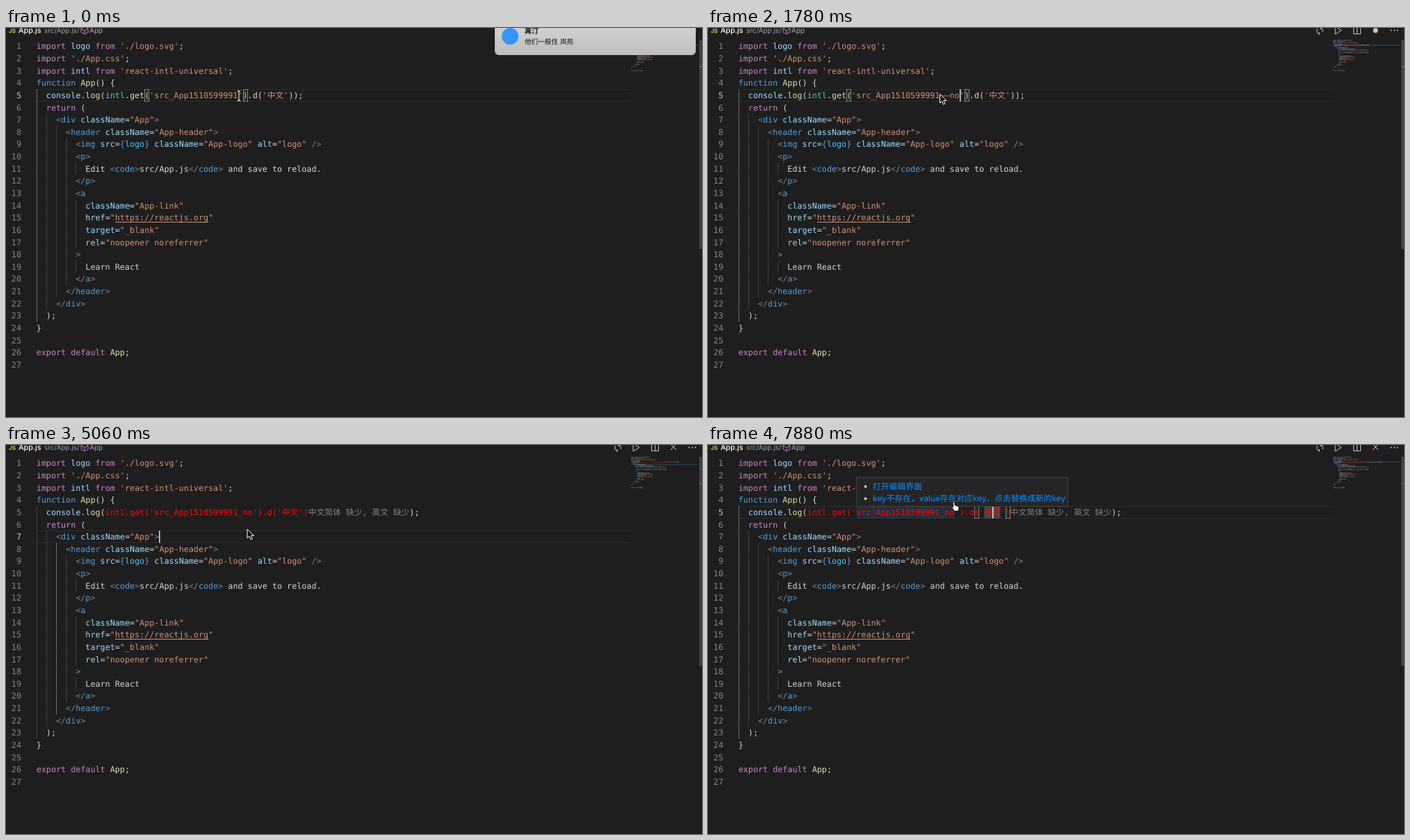
These frames come from a looping animation (1001 px wide and 560 px high, 8 s). An HTML page with a canvas:

```html
<!DOCTYPE html>
<html lang="zh">
<head>
<meta charset="utf-8">
<title>Editor</title>
<style>
  html, body { margin: 0; width: 100%; height: 100%; overflow: hidden; background: #1e1e1e; }
  canvas { display: block; }
</style>
</head>
<body>
<canvas id="stage" width="1001" height="560"></canvas>
<script>
const ctx = document.getElementById('stage').getContext('2d');
const LOOP = 8000, LEFT = 43.7, ROW = 17.63, SIZE = 11.74, CH = SIZE * 0.602;
const MONO = `${SIZE}px "DejaVu Sans Mono", "Noto Sans CJK SC", "Noto Sans CJK", monospace`;
const sans = (size, weight = 400) =>
  `${weight} ${size}px Inter, "Noto Sans CJK SC", "Noto Sans CJK", sans-serif`;
const COLORS = {
  p: '#c586c0', v: '#9cdcfe', s: '#ce9178', w: '#d4d4d4', b: '#569cd6', f: '#dcdcaa',
  g: '#808080', t: '#4ec9b0', c: '#4fc1ff', r: '#ff0000', u: '#ce9178'
};

// Each run is "~", a colour key, then its text.
const CODE = [
  "~pimport ~vlogo ~pfrom ~s'./logo.svg'~w;",
  "~pimport ~s'./App.css'~w;",
  "~pimport ~vintl ~pfrom ~s'react-intl-universal'~w;",
  "~bfunction ~fApp~w() {",
  "",
  "~w  ~preturn ~w(",
  "~w    ~g<~bdiv ~vclassName~w=~s\"App\"~g>",
  "~w      ~g<~bheader ~vclassName~w=~s\"App-header\"~g>",
  "~w        ~g<~bimg ~vsrc~w=~b{~clogo~b} ~vclassName~w=~s\"App-logo\" ~valt~w=~s\"logo\" ~g/>",
  "~w        ~g<~bp~g>",
  "~w          Edit ~g<~bcode~g>~wsrc/App.js~g</~bcode~g>~w and save to reload.",
  "~w        ~g</~bp~g>",
  "~w        ~g<~ba",
  "~w          ~vclassName~w=~s\"App-link\"",
  "~w          ~vhref~w=~s\"~uhttps://reactjs.org~s\"",
  "~w          ~vtarget~w=~s\"_blank\"",
  "~w          ~vrel~w=~s\"noopener noreferrer\"",
  "~w        ~g>",
  "~w          Learn React",
  "~w        ~g</~ba~g>",
  "~w      ~g</~bheader~g>",
  "~w    ~g</~bdiv~g>",
  "~w  );",
  "~w}",
  "",
  "~pexport default ~fApp~w;",
  ""
];

// Stepped tracks: [start time, value]
const SUFFIX = [[0, ''], [1180, '—'], [1330, '——'], [1630, '——n'], [1780, '——no'], [2080, '——n'],
  [2230, '——'], [2530, '—'], [2830, ''], [3280, '_'], [3720, '_n'], [4160, '_no']];
const TOAST = [[0, 0], [900, 10], [1040, 95], [1180, 230], [1330, null]];
const CARET = [[0, false], [150, true], [4310, false], [4610, true], [5350, false],
  [5800, true], [7290, false], [7880, true]];
const MOUSE = [[0, ['beam', 335, 97]], [750, ['arrow', 333.5, 95]], [4310, ['arrow', 341, 116]],
  [4460, ['arrow', 347, 121]], [5210, ['arrow', 364, 111]], [5350, ['arrow', 381, 101]],
  [5500, ['arrow', 388, 94]], [6100, ['arrow', 372, 95]], [6240, ['arrow', 357, 95]],
  [6390, ['arrow', 349, 94]], [6990, ['arrow', 350, 90]], [7140, ['hand', 351, 85]],
  [7290, ['hand', 351, 82]]];

const at = (track, time) => track.findLast(step => step[0] <= time)[1];
const rowTop = line => line * ROW;
const isWide = char => char >= '\u2e80';
const textWidth = text => [...text].reduce((sum, c) => sum + (isWide(c) ? SIZE : CH), 0);
const parse = line => line.split('~').slice(1).map(run => [run[0], run.slice(1)]);

function rect(x, y, w, h, color) {
  ctx.fillStyle = color;
  ctx.fillRect(x, y, w, h);
}
function frame(x, y, w, h, color) {
  ctx.strokeStyle = color;
  ctx.lineWidth = 1;
  ctx.strokeRect(Math.round(x) + .5, Math.round(y) + .5, Math.round(w), Math.round(h));
}
function label(text, x, y, font, color, align = 'left') {
  ctx.font = font;
  ctx.fillStyle = color;
  ctx.textAlign = align;
  ctx.fillText(text, x, y);
}
function disc(x, y, r, color) {
  ctx.fillStyle = color;
  ctx.beginPath();
  ctx.arc(x, y, r, 0, 7);
  ctx.fill();
}
function strokePath(d, color, width = 1) {
  ctx.strokeStyle = color;
  ctx.lineWidth = width;
  ctx.stroke(new Path2D(d));
}

function keyLine(key, missing) {
  return missing
    ? `~w  ~vconsole~w.~flog~w(~rintl.get('${key}').d('中文')~g中文简体 缺少, 英文 缺少~w);`
    : `~w  ~vconsole~w.~flog~w(~tintl~w.~fget~w(~s'${key}'~w).~fd~w(~s'中文'~w));`;
}

function drawCode(lines) {
  lines.forEach((line, i) => {
    let x = LEFT;
    const y = rowTop(i + 1) + 12.8;
    for (const [kind, text] of parse(line)) {
      const width = textWidth(text);
      label(text, x, y, MONO, COLORS[kind]);
      if (kind === 'u') rect(x, Math.round(y + 1.5), width, 1, COLORS.u);
      x += width;
    }
  });
}

function drawGuides(activeLine) {
  const activeCol = activeLine === 7 ? 4 : 0;
  CODE.forEach((line, i) => {
    const indent = i === 4 ? 2 : line.slice(2).search(/[^ ]/);
    const depth = line.startsWith('~w ') && indent > 0 && line[2 + indent] === '~' || i === 4
      ? indent : Math.max(0, indent);
    for (let col = 0; col < depth; col += 2)
      rect(Math.round(LEFT + col * CH), rowTop(i + 1), 1, ROW, col === activeCol ? '#707070' : '#404040');
  });
}

function drawMinimap(lines, activeLine) {
  rect(899, 17 + (activeLine - 1) * 1.75, 97, 1.4, '#263c50');
  ctx.globalAlpha = .5;
  lines.forEach((line, i) => {
    let x = 899;
    for (const [kind, text] of parse(line))
      for (const char of text) {
        const w = isWide(char) ? 1.5 : .88;
        if (char !== ' ') rect(x, 17 + i * 1.75, w * .85, 1.2, COLORS[kind]);
        x += w;
      }
  });
  ctx.globalAlpha = 1;
  rect(997, 17, 4, 301, '#424242');
  rect(997, 55, 4, 1, '#777');
}

function drawHeader(saved, inputBadge) {
  label('JS', 4, 6.5, sans(8, 700), '#cbcb41');
  label('App.js', 18, 7, sans(10.7, 500), '#fff');
  label('src/App.js/', 55, 7, sans(9.9), '#a0a0a0');
  strokePath('M108 1L113 -2L118 1V6L113 9L108 6ZM108 1L113 4L118 1M113 4V9', '#b180d7');
  label('App', 120, 7, sans(10), '#a9a9a9');

  const icon = '#c5c5c5';
  strokePath('M876 1V6Q876 8 880 8M878 6L880 8L878 10M884 6V2Q884 0 880 0M882 -2L880 0L882 2', icon);
  strokePath('M902 -2L911 3.5L902 9Z', icon);
  strokePath('M928.5 -2V8.5H938.5V-2M933.5 -2V8', icon);
  if (saved) strokePath('M956 -1L964 7M964 -1L956 7', icon);
  else disc(960, 3.5, 3.5, icon);
  for (const x of [982.5, 987, 991.5]) disc(x, 3.5, 1, icon);
  if (inputBadge) {
    rect(882, 0, 119, 14, 'rgba(30,30,30,.86)');
    label('Abc', 896, 6, sans(19.3, 500), '#fff');
  }
}

function drawPopup(items) {
  const height = items.length > 1 ? 42 : 24;
  const top = 88 - height;
  const width = items.length > 1 ? 304 : 101;
  rect(213, top, width, height, '#252526');
  frame(213, top, width, height, '#454545');
  items.forEach((text, i) => {
    const y = 81.3 - (items.length - 1 - i) * ROW;
    disc(226.5, y - 4, 2, '#ccc');
    label(text, 237, y, sans(11.8), '#0a8cff');
  });
}

function drawToast(offset) {
  const x = 703 + offset;
  const fill = ctx.createLinearGradient(0, 0, 0, 39);
  fill.addColorStop(0, '#d0d0d0');
  fill.addColorStop(1, '#bdbdbd');
  ctx.fillStyle = fill;
  ctx.beginPath();
  ctx.roundRect(x, -20, 289, 59, 6);
  ctx.fill();
  disc(x + 22, 12, 12, '#3296fa');
  label('苒汀', x + 43, 8, sans(10, 700), '#111');
  label('他们一般住 岚苑', x + 43, 23, sans(9.6), '#111');
}

function drawMouse([kind, x, y]) {
  ctx.save();
  ctx.translate(x, y);
  if (kind === 'beam') {
    const d = 'M-2.5 -7Q0 -7 0 -5V6Q0 8 -2.5 8M2.5 -7Q0 -7 0 -5M0 6Q0 8 2.5 8';
    strokePath(d, '#111', 2.5);
    strokePath(d, '#eee', 1.2);
  } else {
    const hand = kind === 'hand';
    const shape = new Path2D(hand
      ? 'M1 1Q3 -1 4 2V5Q6 4 6.5 6Q8 5 8.5 7Q10 6 10 8L9 13H3L0 8Q0 6 2 7Z'
      : 'M0 0V13L3 10.3L5 15L7.3 14L5.4 9.5H9.5Z');
    ctx.fillStyle = hand ? '#fff' : '#111';
    ctx.fill(shape);
    ctx.lineWidth = 1;
    ctx.strokeStyle = hand ? '#111' : '#fff';
    ctx.stroke(shape);
  }
  ctx.restore();
}

function draw(time) {
  const key = 'src_App1510599991' + at(SUFFIX, time);
  const lines = CODE.slice();
  lines[4] = keyLine(key, time >= 4310);
  const activeLine = time >= 4610 && time < 5800 ? 7 : 5;
  const editingValue = time >= 5800;
  const keyLeft = LEFT + 24 * CH, keyEnd = keyLeft + textWidth(key);
  const valueLeft = keyEnd + 6 * CH, valueEnd = valueLeft + 2 * SIZE;
  const top = rowTop(5);

  rect(0, 0, 1001, 560, '#1e1e1e');
  for (const y of [rowTop(activeLine), rowTop(activeLine + 1) - 1])
    rect(44, Math.round(y), 852, 1, '#2b2b2b');
  drawGuides(activeLine);
  for (let n = 1; n <= 27; n++)
    label(n, 22, rowTop(n) + 12.8, MONO, n === activeLine ? '#c6c6c6' : '#858585', 'right');

  const hoverKey = time >= 750 && time < 1180 || time >= 6690;
  if (time >= 300 && time < 1180) rect(keyLeft, top, keyEnd - keyLeft, ROW, '#505050');
  if (hoverKey) rect(keyLeft, top, keyEnd - keyLeft, ROW, 'rgba(38,79,120,.35)');
  if (time >= 6100) rect(valueLeft, top, valueEnd - valueLeft, ROW, '#474747');
  if (activeLine === 5) {
    const pair = editingValue ? [valueLeft - 2 * CH, valueEnd + CH] : [keyLeft - 2 * CH, keyEnd + CH];
    for (const x of pair) {
      rect(x, top, CH, ROW, 'rgba(0,100,0,.1)');
      frame(x, top, CH - 1, ROW - 1, '#888');
    }
  }
  drawCode(lines);
  if (at(CARET, time)) {
    const x = activeLine === 7 ? LEFT + 25 * CH : editingValue ? valueLeft + SIZE : keyEnd;
    rect(Math.round(x), rowTop(activeLine), 1.5, ROW, '#e0e0e0');
  }

  drawMinimap(lines, activeLine);
  drawHeader(time >= 5060, time >= 2530 && time < 4910);
  if (hoverKey)
    drawPopup(editingValue ? ['打开编辑界面', 'key不存在，value存在对应key，点击替换成新的key'] : ['打开编辑界面']);
  const offset = at(TOAST, time);
  if (offset !== null) drawToast(offset);
  drawMouse(at(MOUSE, time));
}

ctx.textRendering = 'geometricPrecision';
const start = performance.now();
function tick() {
  draw((performance.now() - start) % LOOP);
  requestAnimationFrame(tick);
}
tick();
</script>
</body>
</html>
```
